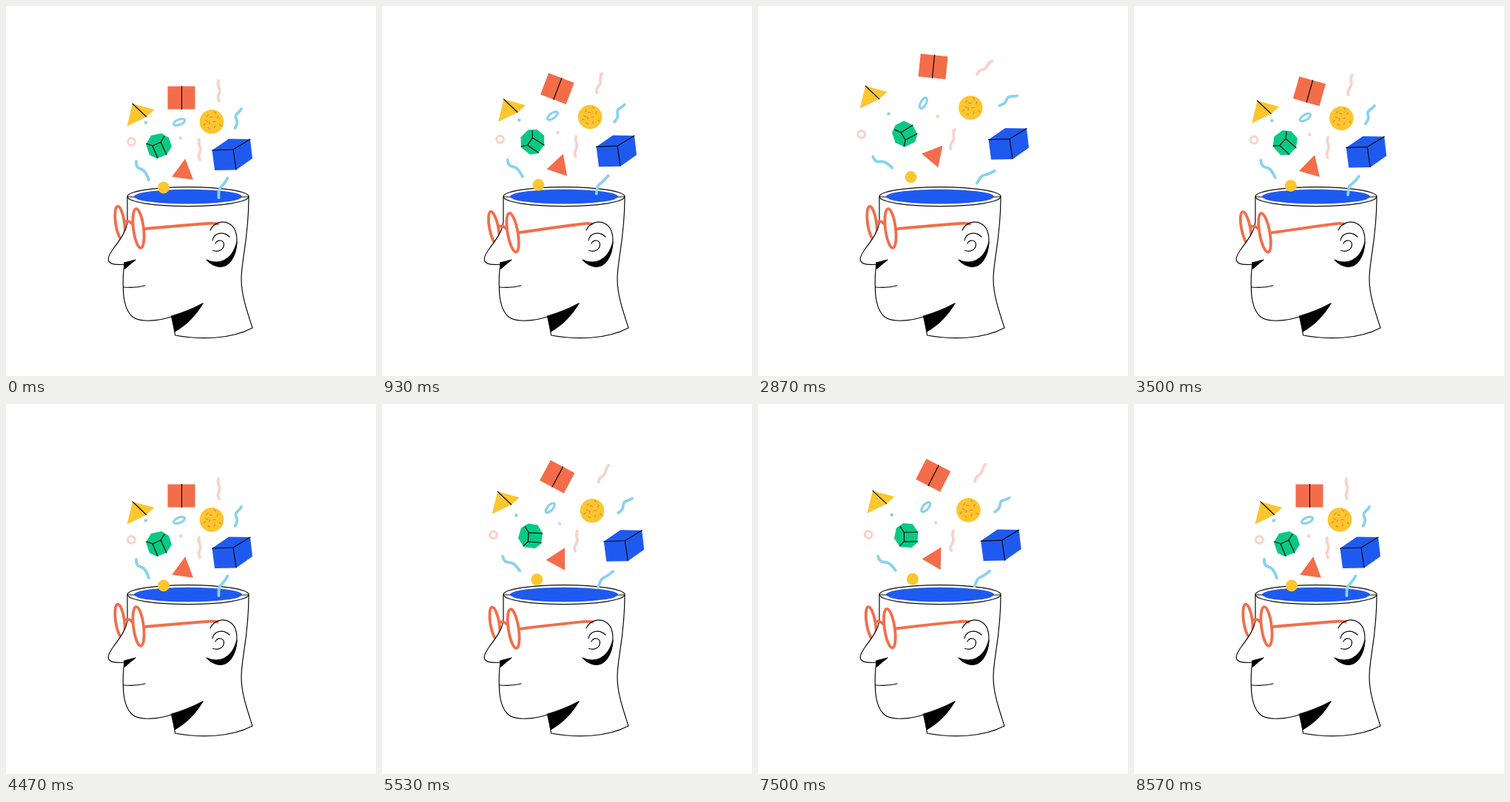
An HTML page that plays this animation: 500 by 500 pixels, repeating every 8.71 s.

```html
<!DOCTYPE html>
<html lang="en">
<head>
<meta charset="utf-8">
<title>Open mind</title>
<style>
  html, body { margin: 0; width: 100%; height: 100%; overflow: hidden; background: #fff; }
  svg { display: block; width: 100%; height: 100%; }
  .ink { stroke: #0a0a0a; stroke-width: 1.2; stroke-linecap: round; stroke-linejoin: round; }
  .frame { stroke: #f46d4a; stroke-width: 3.8; stroke-linecap: round; }
  .wave { stroke-width: 3.8; stroke-linecap: round; }
</style>
</head>
<body>
<svg viewBox="0 0 500 500" fill="none">
  <g class="glasses frame"><ellipse cx="154" cy="293" rx="6" ry="22.5" transform="rotate(-8 154 293)"/></g>

  <g class="ink">
    <path fill="#fff" d="M164 258V290C164 303 154 316 145 328C140 335 137 340 138.500 344C140.500 350 151 349.500 160 349.500C158 361 158 373 158.500 384C159 399 163 413 171 420C181 428 206 426 225 419.500L228.500 445C262 451 303 451 333 435C325 410 318 390 318 369C318 342 328 316 328 258Z"/>
    <path d="M225 419.500Q247 413 266 402M159 380Q174 381.500 188 378"/>
    <path fill="#000" d="M266 402Q245 413 223.500 419L228 440Q251 427 266 402ZM159.500 347L175 343Q167 349 160.500 355Z"/>
    <ellipse cx="246" cy="257.600" rx="82" ry="13"/>
  </g>
  <ellipse cx="246" cy="257.600" rx="73" ry="9.900" fill="#1f5af0"/>

  <g class="glasses frame">
    <ellipse cx="179" cy="300.500" rx="6.900" ry="26.600" transform="rotate(-7 179 300.500)"/>
    <path d="M162 291Q167 290 171 295M188 301Q243 296 271 294Q280 293 286 294.500"/>
  </g>

  <g class="ink">
    <path d="M276 303C281 292 294 289 303 295C313 302 313 315 311 327"/>
    <path fill="#000" d="M312 319C311 340 301 352.500 289 352.500C281 352 275 347 271 343C286 350 305 346 312 319Z"/>
    <path d="M279 317C281 306 294 304 302 312M283 321C286 315 294 316 294.500 322C294.500 329 288 333 279.500 330.500"/>
  </g>

  <g id="toys"></g>
</svg>
<script>
const PERIOD = 4355;               // one rise and fall
const RISE = 470, LENGTH = 1430;   // when the toys lift off, and for how long
const RED = '#f46d4a', YELLOW = '#fcc62f', GREEN = '#08c984', BLUE = '#1f5af0';
const SKY = '#8ad2ec', PINK = '#f8d2cd';
const toys = [];
const layer = document.getElementById('toys');
const glasses = document.querySelectorAll('.glasses');

// A toy floats between two poses [x, y, angle]; lag shifts it in time, sway tilts it on the way
function add(markup, low, high, { lag = 0, sway = 0 } = {}) {
  const node = document.createElementNS('http://www.w3.org/2000/svg', 'g');
  node.innerHTML = markup;
  layer.append(node);
  toys.push({ node, low, high, lag, sway });
}

const dot = (r, color) => `<circle r="${r}" fill="${color}"/>`;
const ring = (rx, ry, color) => `<ellipse rx="${rx}" ry="${ry}" stroke="${color}" stroke-width="3.2"/>`;
const wave = (d, color) => `<path class="wave" d="${d}" stroke="${color}"/>`;
const solid = (outline, color, edges = '') =>
  `<path d="${outline}" fill="${color}"/><path class="ink" d="${edges}"/>`;

// Sprinkles spread over a disc by the golden angle
function sprinkles(count, radius) {
  let d = '';
  for (let i = 0; i < count; i++) {
    const a = i * 2.4, r = radius * Math.sqrt((i + .3) / count);
    d += `M${r * Math.cos(a)} ${r * Math.sin(a)}l${3 * Math.cos(a * 2)} ${3 * Math.sin(a * 2)}`;
  }
  return `<path d="${d}" stroke="#ef843c" stroke-width="1.3" stroke-linecap="round"/>`;
}

const early = { lag: -50 }, late = { lag: 50 };
const pinkWave = wave('M-.5-13.500C-3-6 3-4 1 2S-2 8 .5 13.500', PINK);

add(pinkWave, [287.5, 114.5, 0], [309.5, 77.5, 60], early);
add(pinkWave, [261.5, 194, 0], [263.5, 176.5, 17]);
add(wave('M4.500-12.500C2-7-4-6-3-1S1 5-4 13.500', SKY), [313.5, 151.5, 0], [344.5, 121.5, 53]);
add(wave('M-8.500-12.500C-9-3-4-3-.5-1.500S5 3 8.500 12.500', SKY), [184.5, 222.5, 0], [164.5, 208.5, -32]);
add(wave('M6.500-13C3-7 1-4-2.500-1S-5.500 6-5.500 13.500', SKY), [293, 245.5, 0], [311, 227, 38]);

add(ring(8, 3.6, SKY), [234, 157, -22], [221.5, 126.5, -68], early);
add(ring(4.8, 4.8, PINK), [169.5, 183.5, 0], [134.5, 171.5, 0], early);
add(dot(2.3, SKY), [189, 157.5, 0], [173.5, 143, 0]);
add(dot(2.4, PINK), [236, 178.5, 0], [245, 140, 0], late);
add(dot(8, YELLOW), [213, 245.4, 0], [204.5, 226.5, 0], late);

add(dot(16.3, YELLOW) + sprinkles(11, 13), [278, 156.4, 0], [289, 134, 0], early);
add(solid('M-18.500-15.500h37v31h-37z', RED, 'M.5-15.500v31'), [237, 124, 0], [236.5, 71.5, -20], { sway: 38 });
add(solid('M0 0L29.500 8L18.500 18L-7.500 30.500Z', YELLOW, 'M0 0L18.500 17.500'), [171, 132, 0], [137, 100.5, 0], late);
add(solid('M2.500-17.500L-15.500 7L13.300 11Z', RED), [239.7, 223.7, 0], [237.7, 198, 38], early);
add(solid('M-17-2L-10-14L4-17L14-11L18 1L11 12L-2 17L-12 12.500Z', GREEN,
  'M-16-3L-8 0L3-5L8-13M-8 0L-1 16.500M3-5L11 12'), [206, 189, 0], [197, 170.5, -114], early);
add(solid('M-28.500 1L-6-14.500L23-14L26 12L4 27.500L-25 28Z', BLUE, 'M-28.500 1L0 0L23-14M0 0L4 27'),
  [307, 194, 0], [346, 177, 0], early);

const clamp = v => Math.min(1, Math.max(0, v));
const ease = v => (1 - Math.cos(Math.PI * clamp(v))) / 2;
const start = performance.now();

function draw() {
  const phase = (performance.now() - start) % PERIOD;
  const t = Math.min(phase, PERIOD - phase);  // the fall mirrors the rise
  for (const { node, low, high, lag, sway } of toys) {
    const e = ease((t - RISE - lag) / LENGTH);
    const [x, y, angle] = low.map((v, i) => v + (high[i] - v) * e);
    const tilt = angle + sway * Math.sin(Math.PI * e);
    node.setAttribute('transform', `translate(${x} ${y}) rotate(${tilt})`);
  }
  const slip = Math.sin(Math.PI * clamp((t - 180) / 1340)) ** 2;
  for (const part of glasses)
    part.setAttribute('transform', `translate(${-3 * slip} 0) rotate(${-3.2 * slip} 285 294)`);
  requestAnimationFrame(draw);
}
draw();
</script>
</body>
</html>
```
